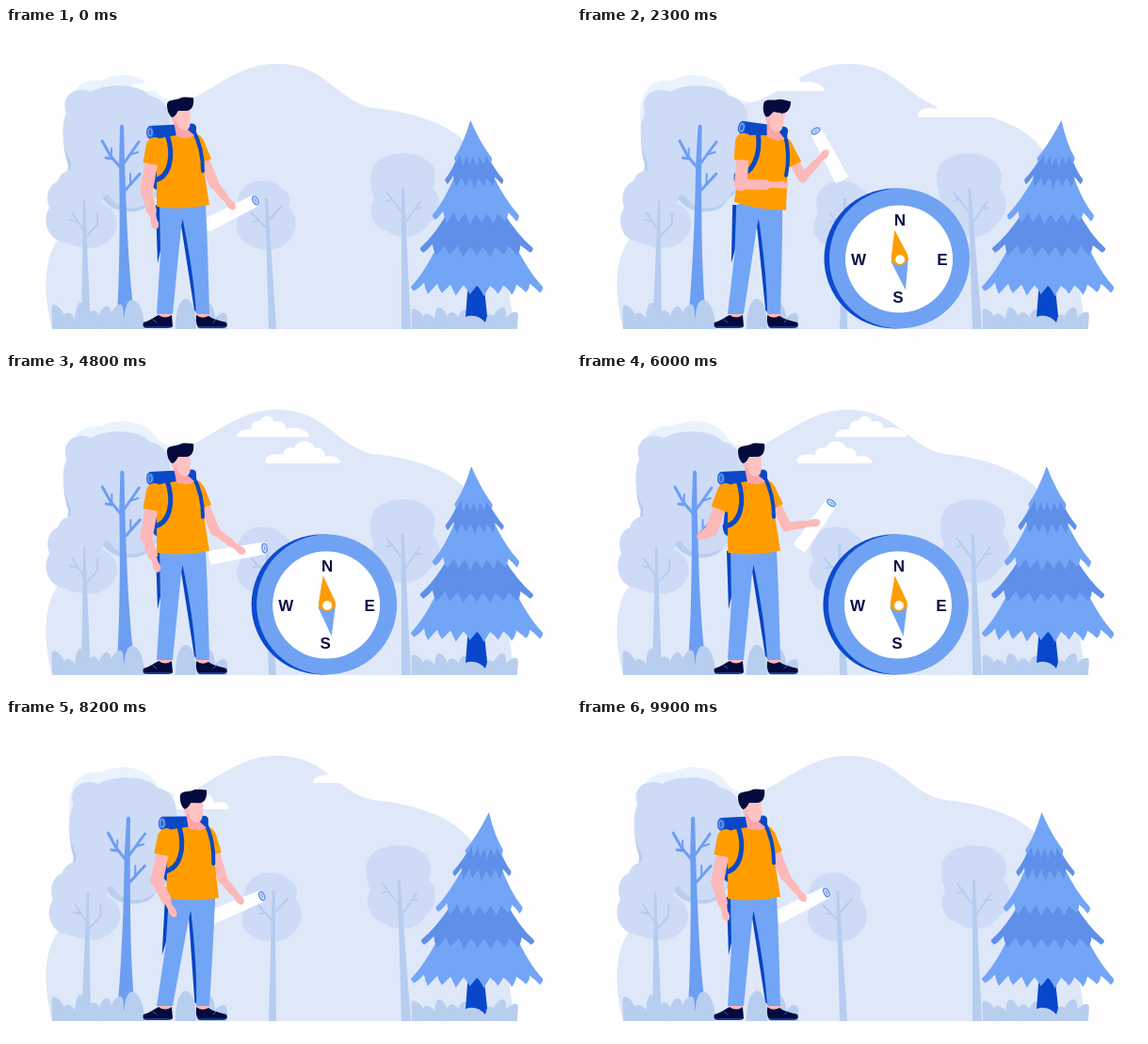
An HTML page for the animation above (10000 ms loop, 600 by 338 pixels).

```html
<!DOCTYPE html>
<html lang="en">
<head>
<meta charset="utf-8">
<title>Hiker with compass</title>
<style>
html, body { margin: 0; width: 100%; height: 100%; overflow: hidden; background: #fefefe; }
svg { display: block; width: 100vw; height: 100vh; }
text { font: bold 17px "Liberation Sans", Arial, sans-serif; text-anchor: middle; fill: #0a1245; }
.line { fill: none; stroke-linecap: round; stroke-linejoin: round; }
.back { stroke: #b6cdef; fill: none; stroke-linecap: round; }
.stem { fill: #b6cdef; }
.leaf { fill: #cedbf7; }
.shade { fill: #b8ceef; }
.skin { stroke: #fdb8b8; }
.sleeve { stroke: #ff9d00; stroke-linecap: butt; }
</style>
</head>
<body>
<svg viewBox="0 0 600 338" preserveAspectRatio="none">
  <path fill="#eaf2fd" d="M68 110C62 70 78 52 101 56C118 46 150 48 161 70C174 80 190 78 200 84L170 120Z"/>
  <path fill="#dfe8f9" d="M49 320C38 278 40 236 62 218L90 110L166 82C174 82 190 79 202 73C234 55 254 38 288 38C340 38 352 78 390 85C440 90 478 105 496 131C515 165 512 210 530 250L540 320Z"/>
  <path id="cloudA" fill="#fff" d="M0 22C0 16 8 13 16 14C14 8 20 4 25 5C28-2 37-2 40 6C46 3 52 8 52 13C62 10 74 14 77 20L76 22Z"/>
  <path id="cloudB" fill="#fff" d="M0 22C2 12 14 14 20 15C18 8 28 6 31 8C34-2 50-2 53 8C62 6 64 14 64 17C72 14 80 18 80 23L78 24H2Z"/>

  <g id="bigTree">
    <path class="shade" d="M64 92C62 74 80 66 92 70C110 58 138 60 150 74C170 78 180 110 172 140C176 165 165 175 155 182C150 199 116 200 104 183C78 186 62 164 66 146C59 125 60 105 64 92Z"/>
    <path class="leaf" d="M64 90C57 72 74 61 90 68C103 59 142 58 152 72C168 74 178 90 172 110C184 130 178 162 160 174C152 196 118 197 109 177C84 182 66 164 69 143C59 125 58 104 64 90Z"/>
  </g>
  <g id="smallTree">
    <path class="leaf" d="M55 163C58 148 80 147 85 160C101 159 107 175 102 187C118 191 124 214 110 225C98 239 74 233 64 228C45 227 37 205 46 191C41 178 46 166 55 163Z"/>
    <path class="stem" d="M80 320L82 183L84 183L90 320Z"/>
    <path class="back" stroke-width="2" d="M83 216L70 196M83 224L97 209V197M76 206L68 204"/>
  </g>
  <g id="midTree">
    <path class="leaf" d="M254 168C264 160 286 161 292 170C302 174 303 184 300 190C312 200 309 221 298 228C290 239 264 236 258 230C244 224 241 208 249 198C244 186 246 174 254 168Z"/>
    <path class="stem" d="M279 320L275 181L278 181L287 320Z"/>
    <path class="back" stroke-width="2" d="M278 214L261 197M278 206L292 190M270 205L262 206"/>
  </g>
  <g id="rightTree">
    <path class="leaf" d="M393 143C404 131 434 130 446 140C458 146 458 162 453 170C466 182 459 201 449 208C440 225 414 225 406 216C390 214 383 195 391 181C385 165 386 151 393 143Z"/>
    <path class="stem" d="M420 320L420 170L423 170L430 320Z"/>
    <path class="back" stroke-width="2" d="M422 198L404 174M423 208L440 184M410 182L404 184M434 192L441 191"/>
  </g>

  <g id="trunk">
    <path fill="#6c9ef2" d="M118 307C121 250 121 190 120 145L121 104Q123 101 125 104L126 145C128 200 130 260 136 303L130 306L125 309Z"/>
    <path class="line" stroke="#6c9ef2" stroke-width="3" d="M122 149L111 136L102 120M113 139L106 138M125 144L141 121M127 172L142 155"/>
    <path class="line" stroke="#6c9ef2" stroke-width="2" d="M112 138V128M131 135L140 132M132 164L132 155"/>
  </g>
  <g id="bushes" class="shade"></g>

  <path fill="#0947ca" d="M491 268L488 307Q500 303 509 313L511 306L507 268Z"/>
  <g id="pine"></g>

  <g id="compass">
    <circle cx="337" cy="245" r="74.5" fill="#0c4bd0"/>
    <circle cx="342.5" cy="245" r="74.5" fill="#70a2f4"/>
    <circle cx="342" cy="245.5" r="57" fill="#fff"/>
    <text x="343" y="210">N</text><text x="388" y="252">E</text>
    <text x="341" y="292">S</text><text x="299" y="252">W</text>
    <g id="needle">
      <path fill="#73a5f5" d="M333 246L343 279L352 246Z"/>
      <path fill="#ff9d00" d="M343 214L352 243C353 255 333 255 334 243Z"/>
      <circle cx="343" cy="246" r="5" fill="#fff"/>
    </g>
  </g>

  <g id="pack">
    <path fill="#0a48c6" d="M160 118L155 165Q156 173 166 174L195 172V118Z"/>
  </g>
  <g id="scroll">
    <path fill="#fff" d="M-31-7.5L29-6.5V6.5L-31 7.5Q-33 0-31-7.5Z"/>
    <ellipse cx="28" rx="4" ry="6.7" fill="#dbe6fb"/>
    <ellipse cx="28" rx="2.6" ry="4.7" fill="none" stroke="#5d8fe6" stroke-width="1.3"/>
    <path class="line" stroke="#5d8fe6" d="M28-2V2"/>
  </g>
  <g id="armL"></g>

  <g>
    <path fill="#fdb8b8" d="M162 299H175V310H162ZM203 299H216V311H203Z"/>
    <path fill="#050a3c" d="M146 313C153 311 158 307 162 305Q169 310 176 305L177 317Q176 319 168 319H149Q144 318 146 313ZM202 305Q208 310 215 306C220 310 228 311 234 313Q237 318 230 319H206Q201 318 202 305Z"/>
    <path class="line" stroke="#2d62cc" stroke-width="1" d="M147 318H175M204 318H233M156 310L160 313M220 313L223 310"/>
  </g>
  <g id="legs">
    <path fill="#0645c2" d="M159 188L161 250L170 210H186L200 300L204 304H212L212 188Z"/>
    <path fill="#73a5f6" d="M163 188C170 186 178 187 190 188L186 212L177 304H160L164 240ZM186 188H212C214 225 215 265 216 304H202C200 268 193 230 187 200Z"/>
  </g>

  <g id="torso">
    <path fill="#0a48c6" d="M152 104L193 102Q202 100 202 106V112L176 118H153Q148 111 152 104Z"/>
    <path fill="#ff9d00" d="M181 114Q192 118 202 113C208 114 210 119 211 127L210 150L216 188Q188 194 160 190L160 148L154 124C157 117 168 116 181 114Z"/>
    <g class="line" stroke="#0a48c6">
      <path stroke-width="5" d="M171 113C179 136 174 159 157 162"/>
      <path stroke-width="4" d="M199 109C207 124 209 138 209 152"/>
    </g>
    <ellipse cx="153" cy="111" rx="4" ry="6.7" fill="#2a67da"/>
    <ellipse cx="153" cy="111" rx="2.2" ry="4" fill="none" stroke="#8db5fa" stroke-width="1"/>
    <path fill="#fba5a8" d="M177 94L181 115Q193 120 200 114L193 108V94Z"/>
    <path fill="#fdc3c3" d="M181 85L195 85Q197 98 195 105Q193 110 187 108Q181 105 181 99Z"/>
    <circle cx="179" cy="97" r="3" fill="#fdb8b8"/>
    <path fill="#050a3c" d="M176 95C172 91 171 86 171 81C172 75 182 77 186 74C191 73 195 74 199 74C200 81 198 88 191 88H183C181 90 181 94 176 95Z"/>
  </g>
  <g id="armR"></g>
</svg>
<script>
const $ = id => document.getElementById(id);
const put = (id, transform) => $(id).setAttribute('transform', transform);
const clamp = x => Math.max(0, Math.min(1, x));
const ease = x => (1 - Math.cos(Math.PI * clamp(x))) / 2;
const mix = (a, b, k) => a + (b - a) * k;
const LOOP = 10;

// Rounded leaf standing on the ground, its tip leaning sideways
const leaf = (x, y, lean, w = 8) =>
  `<path d="M${x - w} 320C${x - w} ${mix(y, 320, .3)} ${x + lean - w * .5} ${y} ${x + lean} ${y}` +
  `C${x + lean + w * .6} ${y} ${x + w} ${mix(y, 320, .4)} ${x + w} 320Z"/>`;
const clump = (x0, count, step, tall) => Array.from({ length: count }, (_, i) =>
  leaf(x0 + i * step, 306 - tall * Math.abs(Math.sin(i * 1.9 + 1)), mix(-6, 6, i / (count - 1)))).join('');
$('bushes').innerHTML = clump(57, 7, 12, 14) + leaf(136, 289, -2, 11) + leaf(191, 288, 0, 11) +
  leaf(214, 292, 0, 9) + leaf(227, 303, 4) + clump(439, 9, 12, 9);

// Pine tiers: top y, top half width, bottom y, bottom half width, colour
const tiers = [
  [228, 40, 275, 70, '#73a5f6'], [193, 28, 234, 60, '#5f8fe8'],
  [154, 19, 199, 46, '#73a5f6'], [130, 13, 161, 31, '#5f8fe8'], [98, 0, 138, 20, '#73a5f6']
];
$('pine').innerHTML = tiers.map(t => `<path fill="${t[4]}"/>`).join('');

function drawPine(sway) {
  const bend = (x, y) => {
    const k = clamp((278 - y) / 180);
    return `${(x + (22.5 * sway - 7) * k * k).toFixed(1)} ${y.toFixed(1)}`;
  };
  tiers.forEach(([top, topW, bottom, bottomW], i) => {
    const teeth = 10 - i;
    const midY = mix(top, bottom, .65), midW = mix(topW, bottomW, .48);
    let d = `M${bend(500 - topW, top)}Q${bend(500 - midW, midY)} ${bend(500 - bottomW, bottom)}`;
    for (let j = 0; j < teeth; j++) {
      const x = k => 500 - bottomW + 2 * bottomW * (j + k) / teeth;
      const side = (j + .5) / teeth - .5;
      const tip = .5 + .6 * side;
      const dip = 4 * Math.cos(Math.PI * side);
      d += `Q${bend(x(tip - .25), bottom + 2)} ${bend(x(tip), bottom + 4 + dip + j % 2 * 2)}`;
      d += `Q${bend(x(tip + .3), bottom + 3)} ${bend(x(1), bottom + (j < teeth - 1 ? dip - 5 : 0))}`;
    }
    d += `Q${bend(500 + midW, midY)} ${bend(500 + topW, top)}Z`;
    $('pine').children[i].setAttribute('d', d);
  });
}

// Pose: hip shift, lean, left elbow, left hand, right elbow, right hand, scroll centre, scroll angle
const poses = {
  rest:    [0, 0, 221, 166, 239, 188, 149, 173, 158, 208, 240, 196, -27],
  inspect: [7, 12.5, 242, 158, 265, 127, 177, 166, 222, 164, 270, 126, -134],
  point:   [0, 0, 222, 168, 245, 190, 149, 170, 190, 187, 242, 194, -1],
  offer:   [0, 0, 222, 167, 249, 187, 149, 173, 160, 205, 247, 190, -10],
  shrug:   [0, 0, 223, 156, 257, 120, 134, 158, 97, 127, 263, 120, -114],
  step:    [10, 2, 230, 169, 248, 191, 160, 171, 177, 204, 246, 198, -23]
};
const keys = [
  [0, 'rest'], [.3, 'rest'], [1.2, 'inspect'], [2.1, 'inspect'], [3, 'point'], [3.6, 'point'],
  [4.5, 'offer'], [5.5, 'offer'], [6.6, 'shrug'], [7.3, 'shrug'], [8.1, 'step'], [8.6, 'step'],
  [9.6, 'rest'], [LOOP, 'rest']
];

function poseAt(t) {
  const i = keys.findIndex((key, n) => n && t <= key[0]);
  const [t0, from] = keys[i - 1], [t1, to] = keys[i];
  const k = ease((t - t0) / (t1 - t0));
  return poses[from].map((v, n) => mix(v, poses[to][n], k));
}

const line = (x1, y1, x2, y2, w, cls) =>
  `<path class="line ${cls}" stroke-width="${w}" d="M${x1} ${y1}L${x2} ${y2}"/>`;

function drawArm(id, [sx, sy], ex, ey, hx, hy, width) {
  const len = Math.hypot(ex - sx, ey - sy), k = Math.min(.6, 20 / len);
  const cuffX = mix(sx, ex, k), cuffY = mix(sy, ey, k);
  const hand = Math.atan2(hy - ey, hx - ex) * 180 / Math.PI;
  $(id).innerHTML = line(cuffX, cuffY, ex, ey, width * .75, 'skin') +
    line(ex, ey, mix(ex, hx, .6), mix(ey, hy, .6), width * .6, 'skin') +
    line(ex, ey, hx, hy, 6.5, 'skin') +
    `<ellipse rx="6" ry="4" fill="#fdb8b8" transform="translate(${hx} ${hy}) rotate(${hand})"/>` +
    `<circle cx="${sx}" cy="${sy}" r="${width / 2}" fill="#ff9d00"/>` +
    line(sx, sy, cuffX, cuffY, width, 'sleeve');
}

function drawMan(t) {
  const [dx, lean, lex, ley, lhx, lhy, rex, rey, rhx, rhy, cx, cy, angle] = poseAt(t);
  const a = lean * Math.PI / 180;
  const turn = (x, y) => [
    188 + dx + (x - 188) * Math.cos(a) - (y - 190) * Math.sin(a),
    190 + (x - 188) * Math.sin(a) + (y - 190) * Math.cos(a)
  ];
  const body = `translate(${dx} 0) rotate(${lean} 188 190)`;
  put('torso', body);
  put('pack', body);
  put('legs', `matrix(1 0 ${-dx / 116} 1 ${dx * 304 / 116} 0)`);
  put('scroll', `translate(${cx} ${cy}) rotate(${angle})`);
  drawArm('armL', turn(204, 123), lex, ley, lhx, lhy, 14);
  drawArm('armR', turn(158, 125), rex, rey, rhx, rhy, 18);
}

function drawCompass(t, sway) {
  const size = ease((t - .5) / .6) * (1 - ease((t - 7.5) / .6));
  put('compass', `translate(${Math.min(0, 3.5 * sway - 2)} 0) translate(342 245) scale(${size}) translate(-342 -245)`);
  const u = Math.max(0, t - .9);
  put('needle', `rotate(${-8 + 40 * Math.exp(-2 * u) * Math.cos(2 * u)} 343 246)`);
}

// Shear a tree about the ground so that its height h moves by shift
const shear = (id, shift, h) => put(id, `matrix(1 0 ${-shift / h} 1 ${shift * 320 / h} 0)`);

function draw(t) {
  const sway = (1 + Math.cos(2 * Math.PI * (t - 2.65) / 5)) / 2;
  put('cloudA', `translate(${245 + 23.8 * (t - 4.8)} 45)`);
  put('cloudB', `translate(${275 - 34.8 * (t - 4.8)} 71)`);
  shear('bigTree', 8 * sway, 217);
  shear('trunk', 8 * sway, 217);
  shear('smallTree', 5 * sway, 150);
  shear('midTree', 8 * sway, 130);
  shear('rightTree', -5 * sway, 150);
  drawPine(sway);
  drawCompass(t, sway);
  drawMan(t);
}

function tick() {
  draw(performance.now() / 1000 % LOOP);
  requestAnimationFrame(tick);
}
tick();
</script>
</body>
</html>
```
